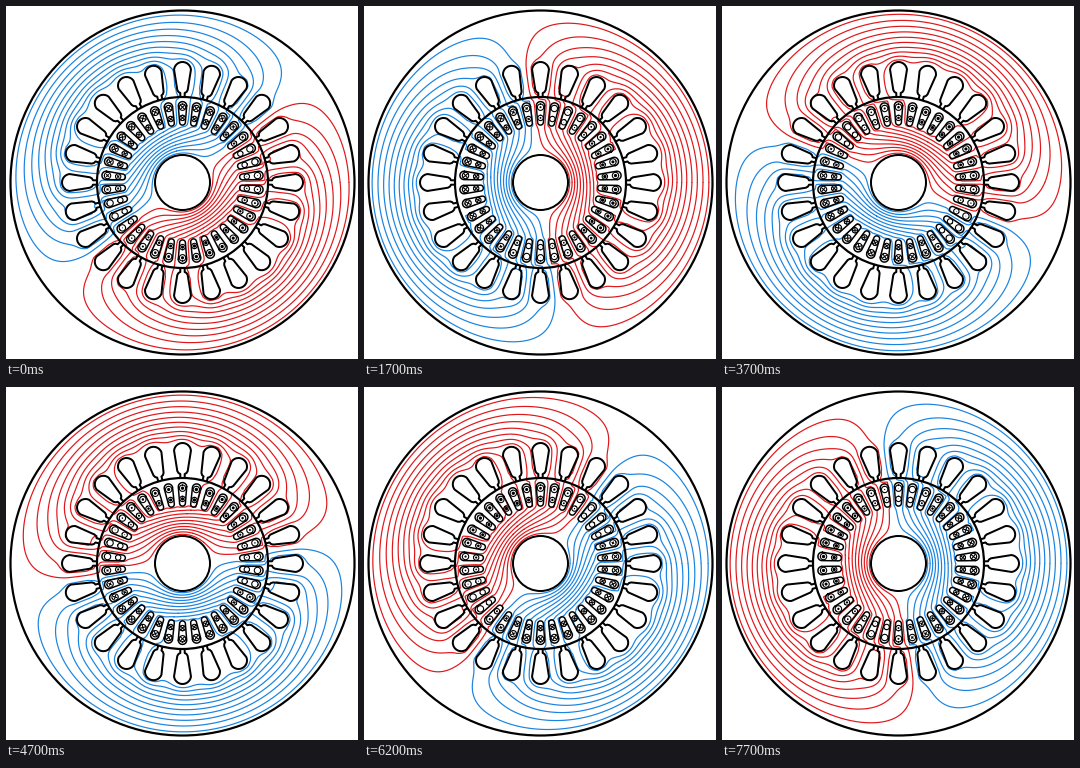
These frames come from a looping animation (352 px wide and 353 px high, 8000 ms). A matplotlib script:

```python
import numpy as np
import matplotlib.pyplot as plt
from matplotlib.animation import FuncAnimation
from matplotlib.collections import LineCollection
from matplotlib.patches import Circle

W, H, DPI = 352, 353, 100
CX, CY = 176.5, 176.5
PX = 72 / DPI
RED, BLUE = "#e0181c", "#1a84e0"
R_OUT, R_BORE, R_SHAFT = 172, 85.5, 27.5
SLOTS, BARS = 24, 34
STATES = 17
START, STEP = 40, 15          # pole axis in degrees

# Polar grid for the vector potential; it is zero on the outer rim
DR, M = 2, 360
r = np.arange(12, R_OUT + 1, DR, dtype=float)
N = len(r) - 1
dth = 2 * np.pi / M
th = np.arange(M) * dth
rc = (r[:-1] + DR / 2)[:, None]
tc = (th + dth / 2)[None, :]


def local(count):
    """Coordinates along and across the nearest slot, and its angle."""
    pitch = 2 * np.pi / count
    phi = (tc - np.pi / 2 + pitch / 2) % pitch - pitch / 2
    return rc * np.cos(phi), rc * np.sin(phi), tc - phi


def inside_stator_slot():
    u, v, centre = local(SLOTS)
    body = np.interp(u, [86, 90, 91, 112], [2, 2, 5, 8.5])
    cap = np.sqrt(np.maximum(8.5 ** 2 - (u - 112) ** 2, 0))
    half = np.where(u > 112, cap, body)
    return (u > 86) & (np.abs(v) < half), centre


def inside_bar():
    u, v, centre = local(BARS)
    half = np.interp(u, [58, 80], [2.8, 4])
    return (u > 57.5) & (u < 81) & (np.abs(v) < half), centre


stator, stator_angle = inside_stator_slot()
rotor, rotor_angle = inside_bar()
gap = (rc > 84) & (rc < 86)
nu = np.where(stator | rotor | gap | (rc < R_SHAFT), 1.0, 0.006)

g_rad = (nu + np.roll(nu, 1, 1)) / 2 * rc * dth / DR
below = np.vstack([np.zeros((1, M)), nu[:-1]])
g_ang = (nu + below) / 2 * DR / (r[:-1, None] * dth)
diag = g_rad + g_ang + np.roll(g_ang, 1, 1)
diag[1:] += g_rad[:-1]


def apply(a):
    flow = g_rad * a
    flow[:-1] -= g_rad[:-1] * a[1:]
    out = flow.copy()
    out[1:] -= flow[:-1]
    turn = g_ang * (np.roll(a, -1, 1) - a)
    return out + np.roll(turn, 1, 1) - turn


def solve(wave):
    """Potential for slot currents following wave(angle)."""
    j = stator * wave(stator_angle) + 0.35 * rotor * wave(rotor_angle + np.pi / 2)
    j = j * rc * DR * dth / 4
    b = j + np.roll(j, 1, 1)
    b[1:] += b[:-1].copy()
    a = np.zeros((N, M))
    res = b.copy()
    z = res / diag
    p = z.copy()
    rz = np.sum(res * z)
    stop = rz * 1e-11
    for _ in range(2500):
        q = apply(p)
        alpha = rz / np.sum(p * q)
        a += alpha * p
        res -= alpha * q
        z = res / diag
        new = np.sum(res * z)
        if new < stop:
            break
        p = z + new / rz * p
        rz = new
    return a


a_cos, a_sin = solve(np.cos), solve(np.sin)


def harmonic(radius):
    return 2 / M * np.sum(a_cos[int((radius - r[0]) / DR)] * np.exp(1j * th))


lag = np.angle(harmonic(146))
scale = abs(harmonic(122))


def place(u, v, ang):
    """Point u along and v across the direction ang, in pixels."""
    u, v = np.asarray(u, float), np.asarray(v, float)
    x = CX + u * np.cos(ang) - v * np.sin(ang)
    y = CY - u * np.sin(ang) - v * np.cos(ang)
    return np.column_stack([x, y])


def arc(u, radius, a0, a1, n=20):
    t = np.radians(np.linspace(a0, a1, n))
    return u + radius * np.cos(t), radius * np.sin(t)


def stator_outline(ang):
    u, v = arc(112, 8.5, -84, 84)
    u = np.r_[86, 89.5, 90.5, 92.5, u, 92.5, 90.5, 89.5, 86]
    v = np.r_[-2.2, -2.2, -4, -5.2, v, 5.2, 4, 2.2, 2.2]
    return place(u, v, ang)


def bar_outline(ang):
    u1, v1 = arc(76.7, 4.2, -90, 90)
    u0, v0 = arc(60.3, 2.9, 90, 270)
    u, v = np.r_[u1, u0, u1[0]], np.r_[v1, v0, v1[0]]
    return place(u, v, ang)


def centres(count):
    return np.pi / 2 + 2 * np.pi * np.arange(count) / count


MARKS = [(75.3, 3.2), (64.6, 2.7)]     # radius of centre, size

fig = plt.figure(figsize=(W / DPI, H / DPI), dpi=DPI, facecolor="white")
ax = fig.add_axes([0, 0, 1, 1])

T, R = np.meshgrid(np.append(th, 2 * np.pi), r)
X, Y = CX + R * np.cos(T), CY - R * np.sin(T)
LEVELS = 0.06 + 0.1 * np.arange(10)


def contour_lines(a, sign):
    cs = ax.contour(X, Y, sign * a, levels=LEVELS)
    lines = [s for level in cs.allsegs for s in level if len(s) > 1]
    cs.remove()
    return lines


def flux(k):
    drive = np.radians(START + STEP * k - 90) - lag
    a = (a_cos * np.cos(drive) + a_sin * np.sin(drive)) / scale
    a = np.vstack([a, np.zeros((1, M))])
    a = np.hstack([a, a[:, :1]])
    return contour_lines(a, 1), contour_lines(a, -1)


def marks(k):
    """Crosses and dots for the bar currents."""
    peak = np.radians(START + STEP * k - 110)
    crosses, dots, sizes = [], [], []
    for ang in centres(BARS):
        amp = np.cos(ang - peak)
        for u, size in MARKS:
            d = size * 0.75 * abs(amp)
            if amp < -0.15:
                crosses += [place([u - d, u + d], [-d, d], ang),
                            place([u - d, u + d], [d, -d], ang)]
            elif amp > 0.15:
                dots.append(place([u], [0], ang)[0])
                sizes.append((3.4 * amp * PX) ** 2)
    return crosses, dots, sizes


fields = [flux(k) for k in range(STATES)]
symbols = [marks(k) for k in range(STATES)]

ax.set_xlim(0, W)
ax.set_ylim(H, 0)
ax.axis("off")


def add_lines(segs, color, px, z):
    lc = LineCollection(segs, colors=color, linewidths=px * PX, zorder=z,
                        capstyle="round", joinstyle="round")
    return ax.add_collection(lc, autolim=False)


def add_circle(radius, px, fill="none", z=4):
    ax.add_patch(Circle((CX, CY), radius, fc=fill, ec="black",
                        lw=px * PX, zorder=z))


red = add_lines([], RED, 1.2, 2)
blue = add_lines([], BLUE, 1.2, 2)
add_lines([stator_outline(a) for a in centres(SLOTS)], "black", 2, 4)
add_lines([bar_outline(a) for a in centres(BARS)], "black", 1.5, 4)
rings = [place(*arc(u, s, 0, 360), a) for a in centres(BARS) for u, s in MARKS]
add_lines(rings, "black", 1.1, 4)
cross = add_lines([], "black", 1.1, 5)
dot = ax.scatter([], [], s=[], c="black", linewidths=0, zorder=5)
add_circle(R_OUT, 2.2)
add_circle(R_BORE, 2.2)
add_circle(R_SHAFT, 2, "white", 6)


def update(n):
    k = (n + 3) // 5
    red.set_segments(fields[k][0])
    blue.set_segments(fields[k][1])
    crosses, dots, sizes = symbols[k]
    cross.set_segments(crosses)
    dot.set_offsets(dots)
    dot.set_sizes(sizes)
    return red, blue, cross, dot


anim = FuncAnimation(fig, update, frames=80, interval=100, repeat=True,
                     repeat_delay=0, blit=False)
plt.show()
```
